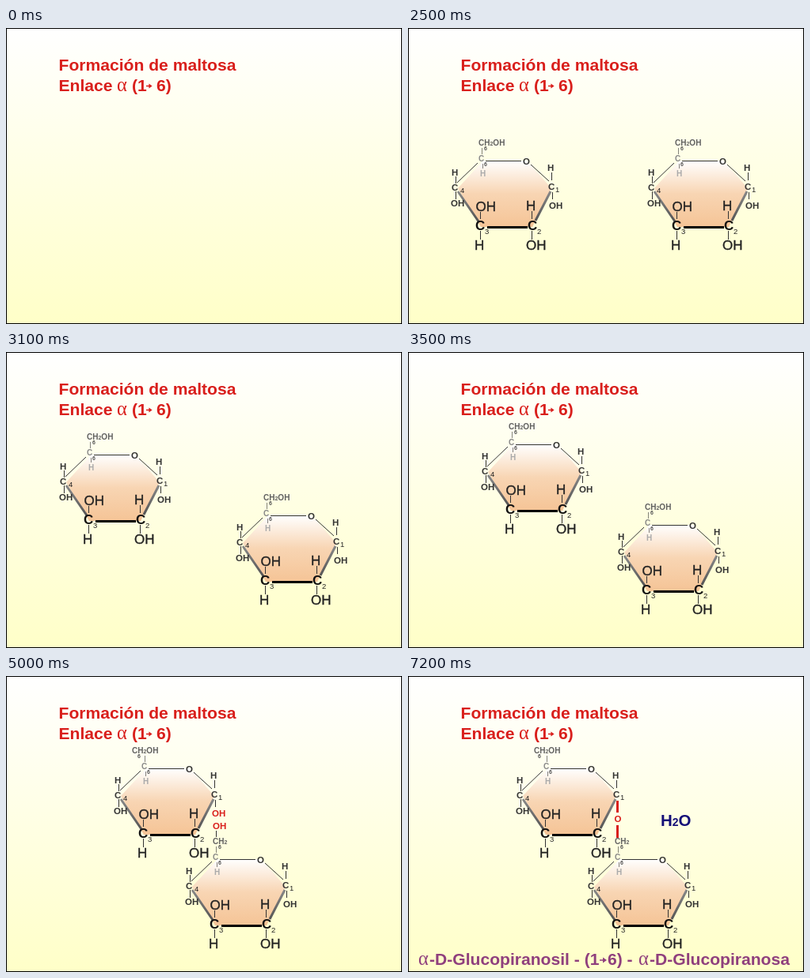
An HTML page for the animation above (8 s loop, 500x375 px).

```html
<!DOCTYPE html>
<html lang="es">
<head>
<meta charset="utf-8">
<title>Formación de maltosa</title>
<style>
html, body { margin: 0; width: 100%; height: 100%; overflow: hidden; }
svg { display: block; width: 500px; height: 375px; font-family: "Liberation Sans", Arial, sans-serif; }
.big { font-size: 21.1px; font-weight: bold; }
.greek { font: 24.5px "Liberation Serif", "Times New Roman", serif; }
.red { fill: #d91f1c; }
.purple { fill: #8f3f7d; }
.water { font-size: 20.5px; font-weight: bold; fill: #150f78; }
.front { font-size: 17px; fill: #222; stroke: #222; stroke-width: .35; }
.carbon { font-size: 17px; font-weight: bold; fill: #111; }
.side { font-size: 11.5px; font-weight: bold; fill: #333; }
.back { font-size: 10px; font-weight: bold; fill: #606060; }
.num { font-size: 9.5px; fill: #222; }
.tiny { font-size: 7px; font-weight: bold; fill: #555; }
.line { fill: none; stroke: #333; }
.redline { fill: none; stroke: #d91f1c; stroke-width: 3; }
</style>
</head>
<body>
<svg viewBox="0 0 500 375">
  <defs>
    <linearGradient id="sky" x2="0" y2="1">
      <stop stop-color="#fff"/><stop offset="1" stop-color="#ffffc8"/>
    </linearGradient>
    <linearGradient id="skin" x2="0" y2="1">
      <stop stop-color="#fff"/><stop offset=".5" stop-color="#f8d5b3"/><stop offset="1" stop-color="#f5c496"/>
    </linearGradient>
    <linearGradient id="edge" x2="0" y2="1">
      <stop stop-color="#888"/><stop offset="1" stop-color="#555"/>
    </linearGradient>
    <g id="ring">
      <path fill="url(#skin)" d="M63 203 95 168H150L181 203 157 252H92Z"/>
      <path class="line" d="M62 196 88 171M98 168.5H143M155 173 178 194"/>
      <path fill="none" stroke="url(#edge)" stroke-width="3" d="M63 207 89 245M180 207 161 244"/>
      <path stroke="#000" stroke-width="3" d="M100 252.5H151"/>
      <path class="line" d="M60.5 188V197M60.5 207V217M181.5 183V193M91.5 233V242M91.5 257V268M156.5 232V242M156.5 257V268"/>
      <path class="line" stroke-opacity=".6" d="M93.5 152V160M94.5 172V178"/>
      <g class="back">
        <text x="89" y="169" fill="#888">C</text>
        <text x="91" y="188" style="fill:#aaa">H</text>
      </g>
      <text class="tiny" x="96" y="175">6</text>
      <g class="side">
        <text x="145" y="173">O</text>
        <text x="176" y="181">H</text>
        <text x="177" y="205">C</text>
        <text x="55" y="187">H</text>
        <text x="55" y="206">C</text>
        <text x="54" y="226">OH</text>
      </g>
      <g class="front">
        <text x="85.5" y="232">OH</text>
        <text x="149" y="231">H</text>
        <text x="84" y="280.5">H</text>
        <text x="149" y="280.5">OH</text>
      </g>
      <text class="carbon" x="85" y="256">C</text>
      <text class="carbon" x="151" y="256">C</text>
      <g class="num">
        <text x="186" y="208">1</text>
        <text x="163" y="261">2</text>
        <text x="97" y="261">3</text>
        <text x="66" y="209">4</text>
      </g>
    </g>
    <g id="hydroxyl">
      <path class="line" d="M182.5 208V217"/>
      <text class="side" x="178" y="229">OH</text>
    </g>
    <text id="tail" class="back" x="89" y="149">CH<tspan font-size="7">2</tspan>OH</text>
    <g id="sugar">
      <text class="greek" x="-1">α</text>
      <text class="big" x="13">-D-Glucopiranosa</text>
    </g>
    <path id="arrow" d="M0-.8H4V-3.5L9 0 4 3.5V.8H0Z"/>
  </defs>

  <rect x=".5" y=".5" width="499" height="374" fill="url(#sky)" stroke="#000"/>
  <g class="red">
    <text class="big" x="66.5" y="54">Formación de maltosa</text>
    <text class="big" x="66.5" y="80">Enlace</text>
    <text class="greek" x="140" y="80">α</text>
    <text class="big" x="159" y="80">(1</text>
    <use href="#arrow" transform="translate(177 73.5) scale(.85)"/>
    <text class="big" x="190" y="80">6)</text>
  </g>

  <g class="purple" data-from="500" data-to="2500">
    <use href="#sugar" x="25" y="316"/>
    <use href="#sugar" x="295" y="316"/>
  </g>

  <g data-from="500">
    <g id="left">
      <use href="#ring"/>
      <use href="#hydroxyl" data-to="4100"/>
      <path class="line" d="M182.5 208V217" data-from="4100" data-to="5600"/>
    </g>
    <g id="leftTail">
      <use href="#tail"/>
      <text class="tiny" id="leftSix" x="96" y="155">6</text>
    </g>
    <g id="right">
      <use href="#ring"/>
      <use href="#hydroxyl"/>
      <use href="#tail" data-to="4100"/>
      <text class="back" x="89" y="149" data-from="4100">CH<tspan font-size="7">2</tspan></text>
      <path class="line" d="M93.5 132V140" data-from="4100" data-to="5600"/>
      <text class="tiny" x="96" y="155">6</text>
    </g>
  </g>

  <g class="side" data-from="4100" data-to="5600">
    <text id="upperOH" y="178" style="fill:#d91f1c">OH</text>
    <text id="lowerOH" y="194" style="fill:#d91f1c">OH</text>
  </g>
  <path class="redline" d="M257 181 272 188" data-from="4300" data-to="5000"/>

  <g data-from="5600">
    <path class="line" d="M264.5 158V168M264.5 194V204" data-to="7200"/>
    <path class="redline" d="M264.5 158V173M264.5 189V205" data-from="7200"/>
    <text class="side" x="260.5" y="185" style="fill:#d91f1c">O</text>
  </g>
  <text class="water" id="water" data-from="6300">H<tspan font-size="14">2</tspan>O</text>

  <g class="purple" data-from="7200">
    <text class="greek" x="13" y="366">α</text>
    <text class="big" x="27" y="366">-D-Glucopiranosil - (1</text>
    <use href="#arrow" x="242" y="360"/>
    <text class="big" x="252" y="366">6) -</text>
    <use href="#sugar" x="292" y="366"/>
  </g>
</svg>
<script>
const LOOP = 8000;
const $ = id => document.getElementById(id);
const timed = document.querySelectorAll("[data-from], [data-to]");

// Offsets for each 200 ms step of the approach, beginning at 2500 ms.
const leftX = [0, 0, 6, 13, 26, 38, 51, 64, 70];
const leftY = [0, -13, -25, -38, -44, -51];
const rightX = [0, 0, -6, -12, -25, -38, -51, -64];
const rightY = [0, 13, 26, 39, 45, 51, 64];
const at = (list, i) => list[Math.min(i, list.length - 1)];
const move = (id, x, y) => $(id).setAttribute("transform", `translate(${x} ${y})`);

function draw(t) {
  for (const el of timed) {
    const { from = 0, to = LOOP } = el.dataset;
    el.style.display = t >= from && t < to ? "" : "none";
  }
  const step = Math.max(0, Math.floor((t - 2500) / 200));
  const join = t >= 5000 ? 12 : 0;
  const x = at(leftX, step), y = at(leftY, step);
  move("left", x + join, y);
  move("leftTail", x, y);
  move("right", 248 + at(rightX, step) - join, at(rightY, step));
  $("leftSix").setAttribute("x", t >= 6300 ? 94 : 96);
  $("upperOH").setAttribute("x", 248 + join);
  $("lowerOH").setAttribute("x", 273 - join);
  move("water", t >= 7200 ? 319 : 279, t >= 7200 ? 190 : 188);
}

function frame() {
  draw(performance.now() % LOOP);
  requestAnimationFrame(frame);
}
frame();
</script>
</body>
</html>
```
